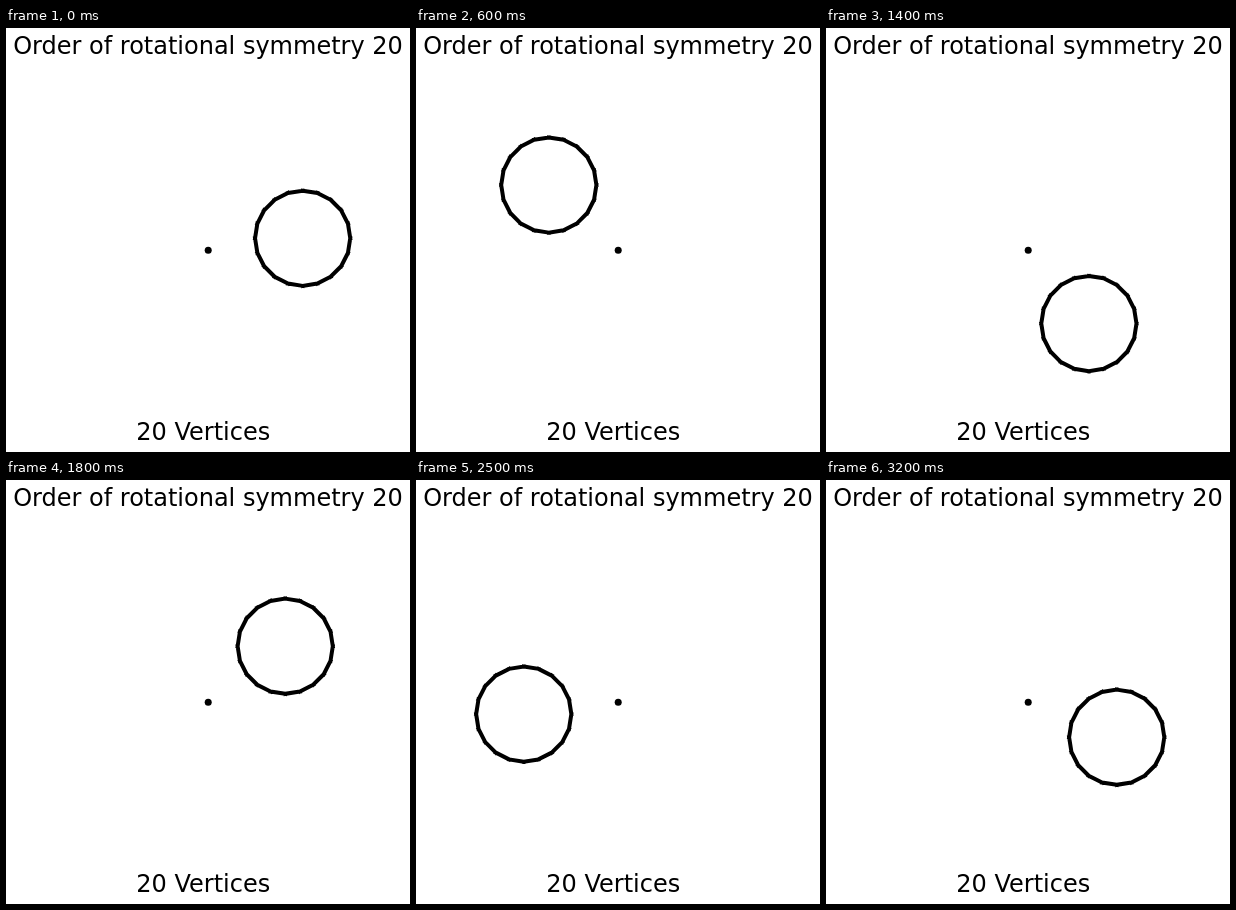
An HTML page for the animation above (3300 ms loop, 404 px wide and 424 px high).

```html
<!DOCTYPE html>
<html lang="en">
<meta charset="utf-8">
<title>Rotational symmetry</title>
<style>
  html, body { margin: 0; height: 100%; overflow: hidden; background: #fff; }
  svg { display: block; }
  text { font: 24px "DejaVu Sans", sans-serif; }
  path { fill: none; stroke: #000; stroke-width: 4; stroke-linecap: square; }
</style>
<svg width="404" height="424" viewBox="0 0 404 424">
  <text x="202" y="26" text-anchor="middle">Order of rotational symmetry 20</text>
  <text x="130.3" y="412">20 Vertices</text>
  <circle cx="202.2" cy="222.2" r="3.5"/>
  <path id="polygon"/>
</svg>
<script>
  const SIDES = 20, RADIUS = 47.6, ORBIT = 95.2, PIVOT = [202.2, 222.2];
  const STEP_MS = 100, STEPS = 33, START_DEG = 7.2, STEP_DEG = 21.6;
  const polygon = document.getElementById('polygon');

  const polar = (r, deg) => {
    const a = deg * Math.PI / 180;
    return [r * Math.cos(a), -r * Math.sin(a)];
  };

  // Separate edges, so that their square caps overlap at each vertex
  let edges = '';
  for (let i = 0; i < SIDES; i++) {
    const turn = 360 / SIDES;
    edges += `M${polar(RADIUS, i * turn)}L${polar(RADIUS, (i + 1) * turn)}`;
  }
  polygon.setAttribute('d', edges);

  const begin = performance.now();
  function draw() {
    const step = Math.floor((performance.now() - begin) / STEP_MS) % STEPS;
    const [x, y] = polar(ORBIT, START_DEG + step * STEP_DEG);
    polygon.setAttribute('transform', `translate(${PIVOT[0] + x} ${PIVOT[1] + y})`);
    requestAnimationFrame(draw);
  }
  draw();
</script>
</html>
```
